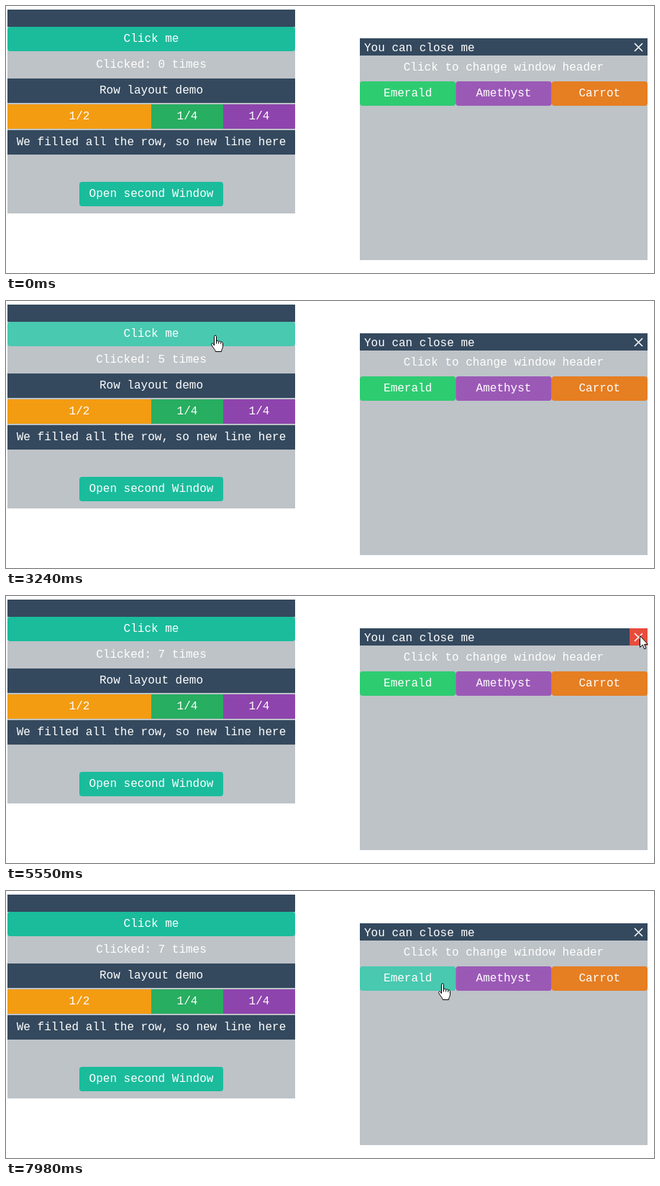
An HTML page that plays this animation: 901 px wide and 372 px high, repeating every 8 s.

```html
<!DOCTYPE html>
<html lang="en">
<head>
<meta charset="utf-8">
<title>GUI windows demo</title>
<style>
  :root { --normal: #1abc9c; --hover: #48c9b0; --active: #16a085; --dark: #34495e; }
  html, body { margin: 0; width: 100%; height: 100%; overflow: hidden; background: #fff; }
  svg { display: block; }
  text { font: 16px "Liberation Mono", "Courier New", monospace; fill: #fff; text-anchor: middle; white-space: pre; }
  .left { text-anchor: start; }
  .pane { fill: #bdc3c7; }
  .dark { fill: var(--dark); }
  .btn { fill: var(--normal); }
  .cross { stroke: #fff; stroke-width: 1.5; fill: none; }

  /* One shared 8 s clock: 1% = 80 ms */
  .anim { animation: 8s step-end infinite; }
  #click { animation-name: click; }
  #digits { animation-name: count; }
  #open { animation-name: open; }
  #second { animation-name: second; }
  #close { animation-name: close; }
  #emerald { fill: #2ecc71; animation-name: emerald; }
  #carrot { fill: #e67e22; animation-name: carrot; }
  #pointer { animation-name: move; }
  #shown { animation-name: appear; }
  #arrow { animation-name: arrow; }
  #hand { animation-name: hand; }
  #arrow, #hand { fill: #fff; stroke: #000; stroke-linejoin: round; }

  @keyframes click {
    0%, 48.025%, 56.85%, 100% { fill: var(--normal); }
    18.02%, 31.5%, 34.625%, 40.5%, 42.25%, 45.1%, 54.887% { fill: var(--hover); }
    30.625%, 33.625%, 38.375%, 41.25%, 44.125% { fill: var(--active); }
  }
  @keyframes count {
    0% { transform: translateY(0); }
    21.875% { transform: translateY(-20px); }
    31.5% { transform: translateY(-40px); }
    34.625% { transform: translateY(-60px); }
    36.5% { transform: translateY(-80px); }
    40.5% { transform: translateY(-100px); }
    42.25% { transform: translateY(-120px); }
    45.1%, 100% { transform: translateY(-140px); }
  }
  @keyframes open {
    0%, 92.87%, 100% { fill: var(--normal); }
    87.125%, 90% { fill: var(--hover); }
    89% { fill: var(--active); }
  }
  @keyframes second {
    0%, 90%, 100% { opacity: 1; }
    77.25% { opacity: 0; }
  }
  @keyframes close {
    0%, 77.25%, 100% { fill: var(--dark); }
    69.375% { fill: #e74c3c; }
  }
  @keyframes emerald {
    0% { fill: #2ecc71; }
    98.77%, 100% { fill: var(--hover); }
  }
  @keyframes carrot {
    0%, 64.625%, 100% { fill: #e67e22; }
    62.68% { fill: var(--hover); }
  }
  @keyframes appear {
    0% { opacity: 0; }
    9.25%, 100% { opacity: 1; }
  }
  @keyframes hand {
    0%, 48.025%, 56.85%, 64.625%, 92.87% { opacity: 0; }
    18.02%, 54.887%, 62.68%, 87.125%, 98.77%, 100% { opacity: 1; }
  }
  @keyframes arrow {
    0%, 48.025%, 56.85%, 64.625%, 92.87% { opacity: 1; }
    18.02%, 54.887%, 62.68%, 87.125%, 98.77%, 100% { opacity: 0; }
  }
  /* The pointer hops along straight legs, about one hop per 78 ms */
  @keyframes move {
    0% { transform: translate(526px, 307px); }
    9.25% { transform: translate(526px, 307px); animation-timing-function: steps(5); }
    14.125% { transform: translate(350px, 120px); animation-timing-function: steps(5); }
    19% { transform: translate(291px, 48px); }
    45.1% { transform: translate(291px, 48px); animation-timing-function: steps(5); }
    49.975% { transform: translate(276px, 82px); animation-timing-function: steps(6); }
    55.875% { transform: translate(248px, 54px); animation-timing-function: steps(4); }
    59.764% { transform: translate(560px, 162px); animation-timing-function: steps(3); }
    62.68% { transform: translate(800px, 132px); animation-timing-function: steps(2); }
    64.625% { transform: translate(722px, 96px); animation-timing-function: steps(5); }
    69.375% { transform: translate(881px, 55px); }
    78.125% { transform: translate(881px, 55px); animation-timing-function: steps(5); }
    83.125% { transform: translate(430px, 210px); animation-timing-function: steps(4); }
    87.125% { transform: translate(233px, 254px); }
    91.89% { transform: translate(233px, 254px); animation-timing-function: steps(5); }
    96.8% { transform: translate(646px, 150px); animation-timing-function: steps(3); }
    99.75%, 100% { transform: translate(607px, 129px); }
  }
</style>
</head>
<body>
<svg width="901" height="372" viewBox="0 0 901 372">
  <g id="first">
    <rect class="pane" x="2" y="5" width="400" height="284"/>
    <rect class="dark" x="2" y="5" width="400" height="24"/>
    <rect id="click" class="btn anim" x="2" y="29" width="400" height="34" rx="4"/>
    <text x="202" y="50">Click me</text>

    <text class="left" x="125.2" y="86">Clicked:</text>
    <svg x="211" y="70" width="11" height="20">
      <g id="digits" class="anim">
        <text class="left" x=".6" y="16">0</text>
        <text class="left" x=".6" y="36">1</text>
        <text class="left" x=".6" y="56">2</text>
        <text class="left" x=".6" y="76">3</text>
        <text class="left" x=".6" y="96">4</text>
        <text class="left" x=".6" y="116">5</text>
        <text class="left" x=".6" y="136">6</text>
        <text class="left" x=".6" y="156">7</text>
      </g>
    </svg>
    <text class="left" x="230.8" y="86">times</text>

    <rect class="dark" x="2" y="101" width="400" height="34"/>
    <text x="202" y="122">Row layout demo</text>
    <rect x="2" y="137" width="200" height="34" fill="#f39c12"/>
    <rect x="202" y="137" width="100" height="34" fill="#27ae60"/>
    <rect x="302" y="137" width="100" height="34" fill="#8e44ad"/>
    <text x="102" y="158">1/2</text>
    <text x="252" y="158">1/4</text>
    <text x="352" y="158">1/4</text>
    <rect class="dark" x="2" y="173" width="400" height="34"/>
    <text x="202" y="194">We filled all the row, so new line here</text>
    <rect id="open" class="btn anim" x="102" y="245" width="200" height="34" rx="4"/>
    <text x="202" y="266">Open second Window</text>
  </g>

  <g id="second" class="anim">
    <rect class="pane" x="492" y="45" width="400" height="309"/>
    <rect class="dark" x="492" y="45" width="400" height="24"/>
    <text class="left" x="498" y="63">You can close me</text>
    <rect id="close" class="dark anim" x="867" y="45" width="25" height="24"/>
    <path class="cross" d="M874 52l11 11m0-11l-11 11"/>
    <text x="692" y="90">Click to change window header</text>
    <rect id="emerald" class="anim" x="492" y="105" width="133.33" height="34" rx="4"/>
    <rect x="625.33" y="105" width="133.33" height="34" rx="4" fill="#9b59b6"/>
    <rect id="carrot" class="anim" x="758.67" y="105" width="133.33" height="34" rx="4"/>
    <text x="558.67" y="126">Emerald</text>
    <text x="692" y="126">Amethyst</text>
    <text x="825.33" y="126">Carrot</text>
  </g>

  <g id="shown" class="anim">
    <g id="pointer" class="anim">
      <path id="arrow" class="anim" d="M.5 .5V16.5L4.2 13.1L6.7 18.8L9 17.8L6.6 12.3H11.5Z"/>
      <g id="hand" class="anim">
        <g transform="translate(-6 -.5)">
          <path d="M4.5 14.5V2a1.5 1.5 0 0 1 3 0V8.5c.3-1 3-1 3.2.6c.4-.9 3-.7 3.1.8c.5-.8 2.7-.5 2.7 1.3V16c0 2.5-2 4-2 7H6.5C6 20.5 3 18 1 14C-.1 11.6 2.3 10.6 3.3 12.2Z"/>
          <path fill="none" d="M7.5 8.5V12M10.7 9.1V12M13.8 9.9V12.5"/>
        </g>
      </g>
    </g>
  </g>
</svg>
</body>
</html>
```
